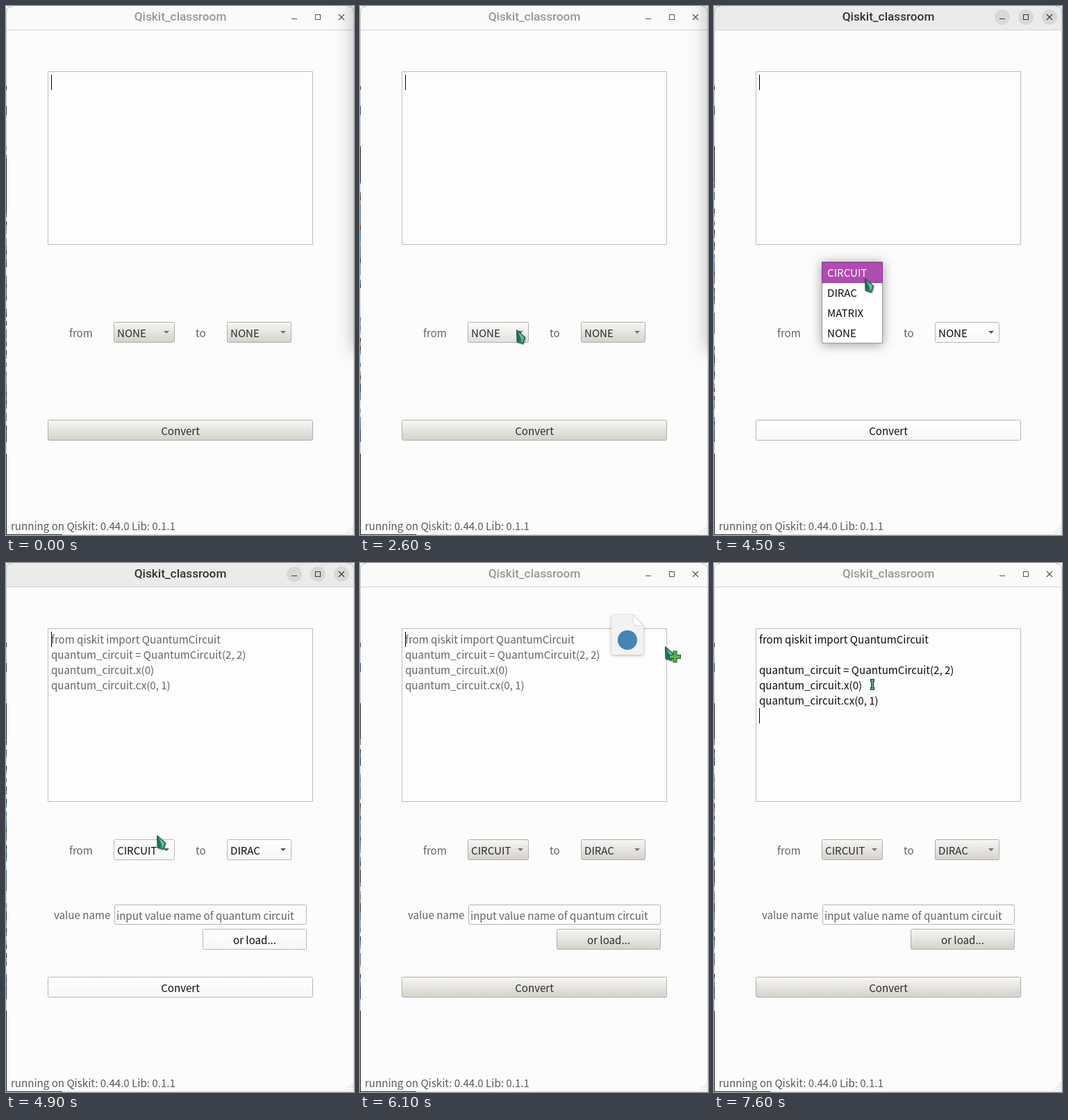
Recreate the animation shown at these times as an HTML page with a canvas. Size 501 by 762 pixels, loop 8 s.

```html
<!DOCTYPE html>
<html lang="en">
<head>
<meta charset="utf-8">
<title>Classroom converter</title>
<style>
  html, body { margin: 0; width: 100%; height: 100%; overflow: hidden; background: #fcfcfc; }
  canvas { display: block; width: 501px; height: 762px; }
</style>
</head>
<body>
<canvas id="stage" width="501" height="762"></canvas>
<script>
const W = 501, H = 762, LOOP = 8000, STEP = 100;
const c = document.getElementById('stage').getContext('2d');
const UI = '15.1px "Noto Sans CJK KR", "Noto Sans CJK JP", "Noto Sans CJK SC", "Noto Sans CJK", "Noto Sans", sans-serif';
const TITLE = '500 17.2px Roboto, sans-serif';

// Moments of the interaction, in ms
const HOVER = 2400, OPEN = 2800, CHOOSE = 4700, BLUR = 5600, DRAG = 6000, DROP = 7100;

const ITEMS = ['CIRCUIT', 'DIRAC', 'MATRIX', 'NONE'];
const HINT = ['from qiskit import QuantumCircuit', 'quantum_circuit = QuantumCircuit(2, 2)',
  'quantum_circuit.x(0)', 'quantum_circuit.cx(0, 1)'];
const CODE = [HINT[0], '', ...HINT.slice(1)];

// Pointer paths: [time, x, y]
const POINTER = [[1500, 452, 500], [1800, 385, 492], [2300, 255, 472], [2400, 232, 467],
  [2600, 225, 466], [3200, 225, 466], [3300, 222, 450], [3500, 217, 414], [4100, 217, 412],
  [4400, 217, 392], [5000, 217, 392], [5300, 360, 330], [5600, 510, 260]];
const DRAGGED = [[6000, 472, 113], [6300, 372, 135], [6600, 245, 162], [6700, 232, 165], [7100, 230, 166]];

const mix = (a, b, k) => a + (b - a) * k;
const grey = v => `rgb(${v},${v},${v})`;

function along(path, t) {
  const i = path.findIndex(p => p[0] >= t);
  if (i < 0) return path[path.length - 1].slice(1);
  if (i === 0) return path[0].slice(1);
  const [a, b] = [path[i - 1], path[i]], k = (t - a[0]) / (b[0] - a[0]);
  return [mix(a[1], b[1], k), mix(a[2], b[2], k)].map(Math.round);
}

function rect(x, y, w, h, fill) {
  c.fillStyle = fill;
  c.fillRect(x, y, w, h);
}

function frame(x, y, w, h, r, fill, line) {
  c.beginPath();
  c.roundRect(x + .5, y + .5, w - 1, h - 1, r);
  c.fillStyle = fill;
  c.fill();
  c.strokeStyle = line;
  c.lineWidth = 1;
  c.stroke();
}

function text(s, x, y, color, align = 'left', font = UI) {
  c.font = font;
  c.fillStyle = color;
  c.textAlign = align;
  c.fillText(s, x, y);
}

function poly(points, fill, line) {
  c.beginPath();
  points.forEach(p => c.lineTo(p[0], p[1]));
  c.closePath();
  c.fillStyle = fill;
  c.fill();
  if (line) {
    c.strokeStyle = line;
    c.lineWidth = 1;
    c.lineJoin = 'round';
    c.stroke();
  }
}

function shade(y, h, top, bottom) {
  const g = c.createLinearGradient(0, y, 0, y + h);
  g.addColorStop(0, top);
  g.addColorStop(1, bottom);
  return g;
}

function buttonFace(x, y, w, h, active, hover) {
  const fill = active ? shade(y, h, '#ffffff', '#f7f7f7')
    : hover ? shade(y, h, '#fdfdfc', '#e1dfdb') : shade(y, h, '#f8f7f4', '#d4d1cc');
  frame(x, y, w, h, 2, fill, active ? '#b7b7b7' : '#b0aeaa');
}

function button(label, x, y, w, active) {
  buttonFace(x, y, w, 30, active);
  text(label, x + w / 2, y + 22, active ? '#0c0c0c' : '#2b2b2b', 'center');
}

function combo(label, x, y, w, active, hover) {
  buttonFace(x, y, w, 30, active, hover);
  text(label, x + 5, y + 22, active ? '#0c0c0c' : '#2b2b2b');
  const ax = x + w - 12, ay = y + 13;
  poly([[ax - 4, ay], [ax + 4, ay], [ax, ay + 4]], active ? '#555' : '#77746f');
}

function titleBar(t) {
  const focus = t < OPEN ? 0 : t <= 5700 ? 1 : Math.max(0, 1 - (t - 5700) / 200);
  rect(0, 0, W, 34, grey(Math.round(mix(250, 235, focus))));
  rect(0, 34, W, 1, '#d3d3d3');
  const lit = t >= OPEN && t < BLUR;
  text('Qiskit_classroom', 251, 21, lit ? '#333333' : '#989898', 'center', TITLE);
  c.fillStyle = `rgba(216,216,216,${focus})`;
  for (const x of [415, 449, 483]) {
    c.beginPath();
    c.arc(x, 16, 11, 0, 7);
    c.fill();
  }
  const ink = lit ? '#383838' : '#555555';
  rect(411, 18, 8, 1, ink);
  c.strokeStyle = ink;
  c.lineWidth = 1;
  c.strokeRect(445.5, 12.5, 7, 7);
  c.lineWidth = 1.2;
  c.beginPath();
  c.moveTo(479, 12); c.lineTo(487, 20);
  c.moveTo(487, 12); c.lineTo(479, 20);
  c.stroke();
}

// Sliver of the desktop beside the window
function edges(t) {
  let seed = 17 + Math.min(t, 600) / 100 * 31 + (t >= OPEN ? 53 : 0) + (t >= BLUR ? 71 : 0);
  const rand = () => (seed = (seed * 16807 + 11) % 2147483647) / 2147483647;
  rand(); rand();
  const tones = ['#252525', '#8f8f8f', '#d8d8d8', '#326ca0', '#666666'];
  rect(0, 8, 1, 194, '#c4c4c4');
  rect(0, 115, 1, 6, '#333');
  rect(0, 144, 1, 13, '#2c3f60');
  for (let y = 202; y < 610; y += 6) rect(0, y, 1, 6, tones[Math.floor(rand() * tones.length)]);
  rect(0, t < 100 ? 220 : 202, 1, t < 100 ? 78 : 52, '#1d1d1f');
  rect(0, 610, 1, 18, '#2a3550');
  rect(0, 628, 1, 17, '#c4c4c4');
  rect(0, 645, 1, 117, '#1b1b1b');
  rect(0, 761, W, 1, '#dddddd');
  rect(0, 761, 81, 1, '#303030');
  rect(500, 8, 1, 754, '#d2d2d2');
  c.strokeStyle = '#bcbcbc';
  c.lineWidth = 1;
  c.beginPath();
  c.moveTo(.5, 9); c.quadraticCurveTo(.5, .5, 9, .5);
  c.moveTo(492, .5); c.quadraticCurveTo(500.5, .5, 500.5, 9);
  c.stroke();
  if (t < OPEN) {
    c.save();
    c.shadowColor = 'rgba(0,0,0,.28)';
    c.shadowBlur = 28;
    rect(501, -40, 60, 537, '#000');
    c.restore();
  }
}

function grip() {
  for (let i = 0; i < 4; i++)
    for (let j = 3 - i; j < 4; j++) rect(489 + i * 3, 749 + j * 3, 1, 1, '#a9a9a9');
}

function editor(t) {
  frame(60, 94, 382, 250, 0, '#fdfdfd', '#bdbdbd');
  const done = t >= DROP;
  const lines = done ? CODE : t >= CHOOSE ? HINT : [];
  lines.forEach((s, i) => text(s, 65, 116 + i * 22, done ? '#0d0d0d' : '#646464'));
  rect(65, done ? 209 : 99, 1, 22, '#000');
}

function popup(y) {
  c.save();
  c.shadowColor = 'rgba(0,0,0,.38)';
  c.shadowBlur = 15;
  c.shadowOffsetY = 2;
  rect(155, 368, 88, 118, '#fff');
  c.restore();
  frame(155, 368, 88, 118, 0, '#fff', '#999999');
  const hot = Math.max(0, Math.min(3, Math.floor((y - 369) / 29)));
  frame(155, 369 + hot * 29, 88, 30, 0, '#b14bb1', '#86388a');
  ITEMS.forEach((s, i) => text(s, 163, 390 + i * 29, i === hot ? '#fff' : '#0c0c0c'));
}

function arrow(x, y) {
  c.save();
  c.translate(x, y);
  c.shadowColor = 'rgba(0,0,0,.35)';
  c.shadowBlur = 2;
  c.shadowOffsetX = c.shadowOffsetY = 1;
  poly([[.5, .5], [12.5, 11], [9.5, 20.5], [5, 19], [1, 18]], '#2f927c', '#1c5348');
  c.shadowColor = 'transparent';
  poly([[1.5, 3], [7, 12], [5, 18], [1.8, 16.5]], '#1f6e5e');
  poly([[3, 4], [11, 11], [9, 19], [7, 14]], '#68b99d');
  c.restore();
}

function dragFile(x, y) {
  c.save();
  c.translate(x - 77, y - 45);
  c.shadowColor = 'rgba(0,0,0,.3)';
  c.shadowBlur = 4;
  c.shadowOffsetY = 1;
  c.beginPath();
  c.moveTo(4, 0); c.lineTo(31, 0); c.lineTo(46, 15); c.lineTo(46, 53);
  c.quadraticCurveTo(46, 57, 42, 57);
  c.lineTo(4, 57);
  c.quadraticCurveTo(0, 57, 0, 53);
  c.lineTo(0, 4);
  c.quadraticCurveTo(0, 0, 4, 0);
  c.fillStyle = '#f3f2f2';
  c.fill();
  c.restore();
  c.save();
  c.translate(x - 77, y - 45);
  poly([[31, 0], [46, 15], [34, 15], [31, 12]], '#ffffff', '#d9d7d7');
  c.beginPath();
  c.arc(23, 36, 14, 0, 7);
  c.fillStyle = '#4584b6';
  c.fill();
  c.restore();
  arrow(x, y);
  for (const [grow, color] of [[1, '#1d5c1c'], [0, '#58b544']]) {
    rect(x + 7 - grow, y + 13 - grow, 15 + 2 * grow, 4 + 2 * grow, color);
    rect(x + 12.5 - grow, y + 7.5 - grow, 4 + 2 * grow, 15 + 2 * grow, color);
  }
  rect(x + 7, y + 13, 15, 4, '#58b544');
}

function beam(x, y) {
  for (const [grow, color] of [[1, '#16352e'], [0, '#55ad92']]) {
    rect(x - 2 - grow, y - 7 - grow, 4 + 2 * grow, 2 + 2 * grow, color);
    rect(x - 2 - grow, y + 5 - grow, 4 + 2 * grow, 2 + 2 * grow, color);
    rect(x - 1 - grow, y - 7, 2 + 2 * grow, 14, color);
  }
}

function draw(t) {
  const active = t >= OPEN && t < 5800;
  const chosen = t >= CHOOSE;
  const top = chosen ? 398 : 455;
  const label = '#646464';
  rect(0, 0, W, H, '#fcfcfc');
  titleBar(t);
  editor(t);

  text('from', 91, top + 22, label);
  text('to', 273, top + 22, label);
  combo(chosen ? 'CIRCUIT' : 'NONE', 155, top, 88, active, t >= HOVER && t < OPEN);
  combo(chosen ? 'DIRAC' : 'NONE', 318, top, 93, active);
  if (chosen) {
    text('value name', 69, 513, label);
    frame(156, 492, 277, 29, 2, '#fbfbfb', '#b5b5b5');
    text('input value name of quantum circuit', 159, 514, label);
    button('or load...', 283, 527, 150, active);
  }
  button('Convert', 60, 596, 382, active);
  text('running on Qiskit: 0.44.0 Lib: 0.1.1', 7, 755, '#5a5a5a');
  grip();
  edges(t);

  const [x, y] = along(POINTER, t);
  if (t >= OPEN && !chosen) popup(y);
  if (t >= 1500 && t < BLUR) arrow(x, y);
  if (t >= DRAG && t < DROP) dragFile(...along(DRAGGED, t));
  if (t >= DROP) beam(228, 175);
}

function tick() {
  draw(Math.floor(performance.now() % LOOP / STEP) * STEP);
  requestAnimationFrame(tick);
}
tick();
</script>
</body>
</html>
```
